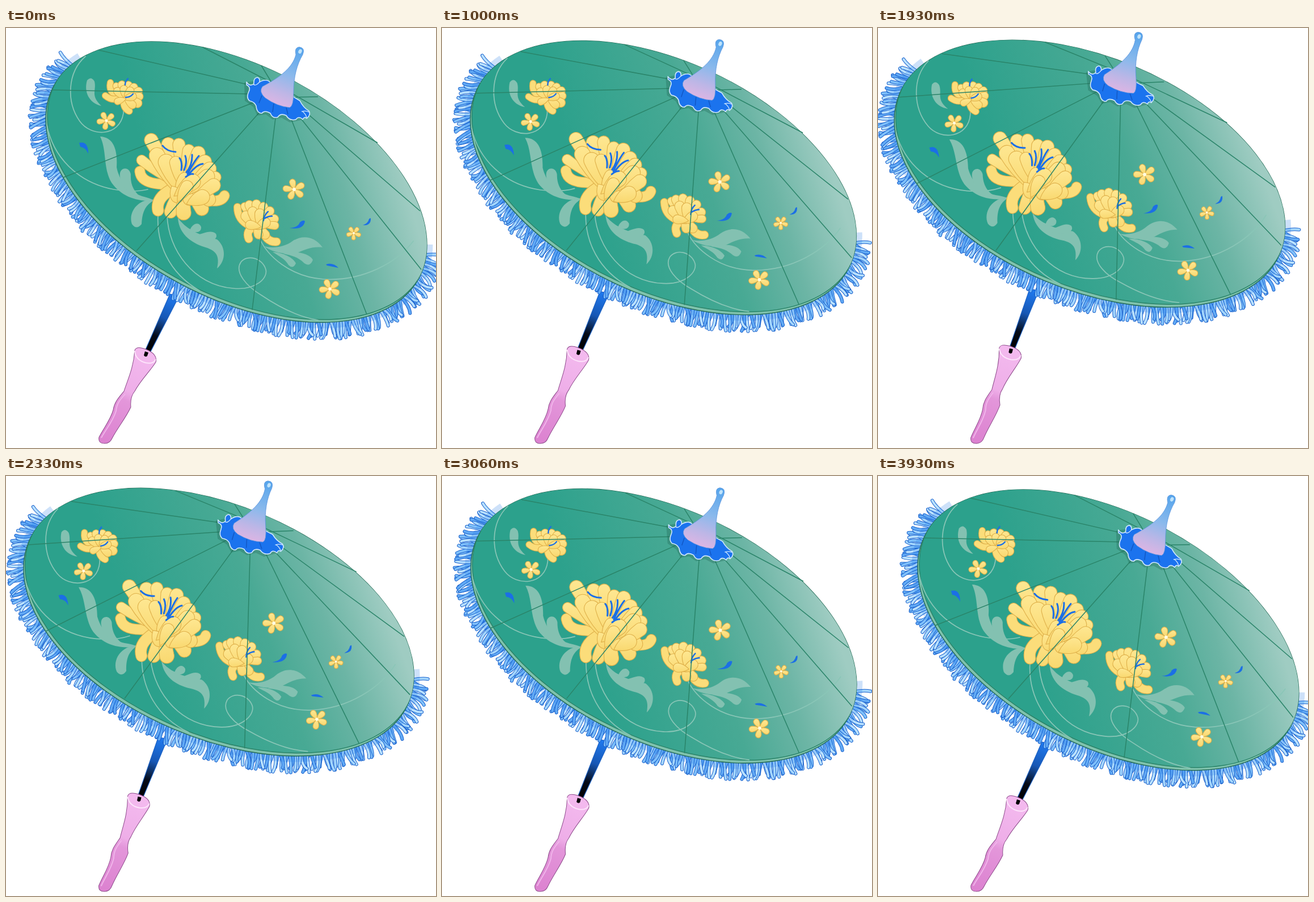
These frames come from a looping animation (758x739 px, 4 s). An HTML page:

```html
<!DOCTYPE html>
<html lang="en">
<head>
<meta charset="utf-8">
<title>Parasol</title>
<style>
html, body { margin: 0; width: 100%; height: 100%; overflow: hidden; background: #fff; }
svg { display: block; width: 100%; height: 100%; }
.line { fill: none; stroke: #8ac6b7; stroke-width: 1.7; stroke-linecap: round; }
.leaf { fill: #83c1b1; }
.petal { fill: url(#gold); stroke: #dfb04a; stroke-width: 1.1; stroke-linejoin: round; }
.curl { fill: none; stroke-linecap: round; }
.ink { fill: none; stroke: #1b6fe6; stroke-width: 3; stroke-linecap: round; }
.rib { stroke: #2a8469; stroke-width: 1.5; }
</style>
</head>
<body>
<svg viewBox="0 0 758 739">
  <defs>
    <linearGradient id="silk" gradientUnits="userSpaceOnUse" x1="330" y1="400" x2="645" y2="106">
      <stop offset="0" stop-color="#2ca18c"/><stop offset=".5" stop-color="#48a994"/>
      <stop offset=".75" stop-color="#6cb5a5"/><stop offset="1" stop-color="#9fccc2"/>
    </linearGradient>
    <linearGradient id="gold" x1="0" y1="0" x2="0" y2="1">
      <stop offset="0" stop-color="#fee791"/><stop offset="1" stop-color="#f9d870"/>
    </linearGradient>
    <linearGradient id="cone" gradientUnits="userSpaceOnUse" x1="517" y1="35" x2="477" y2="138">
      <stop offset="0" stop-color="#56a5ec"/><stop offset=".45" stop-color="#8ab9ec"/>
      <stop offset=".75" stop-color="#bdb6e6"/><stop offset="1" stop-color="#e0b5e3"/>
    </linearGradient>
    <linearGradient id="shaft" gradientUnits="userSpaceOnUse" x1="296" y1="470" x2="252" y2="570">
      <stop offset="0" stop-color="#1f7af0"/><stop offset=".4" stop-color="#1757b4"/>
      <stop offset=".72" stop-color="#050b18"/><stop offset="1" stop-color="#000"/>
    </linearGradient>
    <linearGradient id="pink" gradientUnits="userSpaceOnUse" x1="245" y1="575" x2="174" y2="728">
      <stop offset="0" stop-color="#f3b9ee"/><stop offset=".42" stop-color="#eeaee8"/>
      <stop offset=".52" stop-color="#e396da"/><stop offset="1" stop-color="#dc82d0"/>
    </linearGradient>
    <clipPath id="disc"><ellipse cx="406" cy="271" rx="363.5" ry="204.4" transform="rotate(27.5 406 271)"/></clipPath>
  </defs>

  <g id="parasol">
    <path d="M289 468L305 472L251 577Q246 581 242 575Z" fill="url(#shaft)" stroke="#1d62c4" stroke-width="1.2"/>
    <path d="M227 567C225 598 214 620 208 639C199 650 191 658 189 672C184 690 172 704 164 720Q162 731 174 731Q183 731 187 722C197 703 212 685 220 667C219 655 221 646 227 639C237 620 254 604 264 588Q268 574 246 565Q230 559 227 567Z" fill="url(#pink)" stroke="#8e4c8c"/>
    <path d="M210 644C202 653 195 660 194 674C188 693 176 706 168 721" fill="none" stroke="#f0b4ea" stroke-width="2"/>
    <path d="M227 568Q228 584 246 589Q260 592 264 583" fill="none" stroke="#fde4fb" stroke-width="2"/>
    <path d="M251 571L249 577Q246 580 243 576L245 569Z"/>

    <g id="rim">
      <g id="fringe" fill="none" stroke-linecap="round"></g>
      <ellipse cx="406" cy="271" rx="366" ry="207" transform="rotate(27.5 406 271)" fill="none" stroke="#1d76e4" stroke-width="16" opacity=".22" pathLength="360" stroke-dasharray="194 154 12"/>
      <ellipse cx="406" cy="271" rx="363.5" ry="204.4" transform="rotate(27.5 406 271)" fill="#7fc3ad" stroke="#246a56" stroke-width="1.4"/>
      <g clip-path="url(#disc)">
        <ellipse cx="409" cy="266" rx="363.5" ry="204.4" transform="rotate(27.5 409 266)" fill="url(#silk)" stroke="#2a8469" stroke-width="1.5"/>
      </g>
    </g>

    <g id="decor">
      <g class="line">
        <path d="M140 50C108 78 106 130 130 164C150 192 200 192 207 150Q208 140 204 133"/>
        <path d="M72 170C82 225 125 272 190 284Q225 290 250 284"/>
        <path d="M268 328C265 378 286 430 341 462"/>
        <path d="M284 330C286 390 330 452 400 458C440 462 462 440 458 425C452 404 425 398 414 412C402 430 425 455 450 470C490 497 525 510 550 514"/>
        <path d="M447 370C460 400 500 438 560 442C630 446 690 412 718 375"/>
      </g>
      <g class="leaf">
        <path d="M143 92Q150 84 156 94C160 110 148 118 168 137C146 132 137 112 143 92Z"/>
        <path d="M166 191C190 192 197 215 195 245C200 270 215 288 240 296Q256 300 262 304C230 306 203 296 186 272C171 247 178 215 166 191Z"/>
        <path d="M201 262C198 244 218 242 220 258C219 275 225 290 242 300C215 292 203 279 201 262Z"/>
        <path d="M264 302C232 299 215 325 222 345Q230 356 239 345C240 325 245 310 264 302Z"/>
        <path d="M303 334C305 365 330 380 355 387C371 393 377 402 372 423C388 410 388 385 372 372C350 366 322 360 303 334Z"/>
        <path d="M306 346C330 364 345 362 344 350C339 339 328 346 325 354Z"/>
        <path d="M325 367C350 362 360 354 370 362C376 374 355 380 325 367Z"/>
        <path d="M455 384C470 388 490 386 505 375C520 365 542 364 558 386C540 384 528 390 515 395C495 400 470 395 455 384Z"/>
        <path d="M470 394C485 395 505 402 511 414Q506 425 498 417C492 406 482 402 470 394Z"/>
        <path d="M488 397C508 391 535 396 541 408Q536 421 526 414C515 403 503 400 488 397Z"/>
      </g>
      <g id="blooms"></g>
      <g class="ink">
        <path d="M276 207Q283 217 299 218M309 250Q311 235 306 229M314 250Q320 235 316 225M318 254Q329 240 328 223M320 257Q332 234 340 225M322 258Q336 240 347 239M317 262Q325 256 330 257"/>
        <path d="M210 100Q210 94 215 89M211 122Q219 122 224 116" stroke-width="2.4"/>
        <path d="M454 339Q455 329 462 323M456 335Q462 331 469 331" stroke-width="2.4"/>
      </g>
      <g fill="#1b6fe6">
        <path d="M129 202Q145 198 145 221Q140 210 131 209Z"/>
        <path d="M500 352Q515 351 518 342Q524 337 527 340Q524 356 500 352Z"/>
        <path d="M629 347Q638 344 640 336Q643 333 643 336Q643 348 629 347Z"/>
        <path d="M564 416Q576 412 586 422Q576 420 566 418Z"/>
      </g>
    </g>

    <g id="ribs"></g>

    <path d="M420 96L447 92L533 152L520 162L500 166L486 158L470 161L458 152L443 154L436 139L421 128Z" fill="#1d5e4e" opacity=".3"/>
    <path d="M424 95Q430 104 437 98Q436 88 443 87Q448 88 447 95Q460 88 466 96L518 128Q524 140 534 146Q538 153 530 159Q526 155 523 161Q516 154 511 161Q500 164 494 154Q484 149 479 157Q470 160 466 150Q456 144 451 150Q442 150 441 137Q438 130 429 128Q423 122 428 112Q432 104 424 100Z" fill="#1b73ee" stroke="#cfe7ff" stroke-width="1.6" stroke-linejoin="round"/>
    <path d="M436 99Q440 103 447 95M521 147Q529 145 534 148M523 147Q529 152 530 158" fill="none" stroke="#cfe7ff" stroke-width="1.3"/>
    <path d="M451 119L446 132M472 133L470 148M494 140L497 152" stroke="#1257c4" stroke-width="1.5"/>
    <path d="M511 47C505 70 484 86 452 103Q445 112 457 123Q478 138 500 140Q507 138 507 112C507 86 513 64 523 47Q528 35 517 33.500Q508 34 511 47Z" fill="url(#cone)" stroke="#5a93dc" stroke-width=".8"/>
    <ellipse cx="518.500" cy="41" rx="3" ry="4" fill="#bfe3fb" transform="rotate(25 518 41)"/>
  </g>
</svg>
<script>
const $ = id => document.getElementById(id);
const add = (parent, tag, attrs) => {
  const el = document.createElementNS('http://www.w3.org/2000/svg', tag);
  for (const k in attrs) el.setAttribute(k, attrs[k]);
  return parent.appendChild(el);
};
let seed = 11;
const rand = () => (seed = seed * 16807 % 2147483647) / 2147483647;

// Fringe strands spaced evenly along the lower part of the rim
function drawFringe() {
  const a = 363.5, b = 204.4, tilt = 27.5 * Math.PI / 180;
  const co = Math.cos(tilt), si = Math.sin(tilt);
  const turn = (x, y) => [x * co - y * si, x * si + y * co];
  const tones = ['#a4d6fd', '#7fc0fa', '#b9e1ff', '#62aaf5'];
  for (let t = -0.2; t < 3.4; t += 4.3 / Math.hypot(a * Math.sin(t), b * Math.cos(t))) {
    const [px, py] = turn(a * Math.cos(t), b * Math.sin(t));
    const [nx, ny] = turn(Math.cos(t) / a, Math.sin(t) / b);
    const dir = Math.atan2(ny / Math.hypot(nx, ny) + 0.25, nx / Math.hypot(nx, ny)) + (rand() - 0.5) * 0.7;
    const len = 21 + 9 * rand(), bend = (rand() - 0.5) * 14;
    const dx = Math.cos(dir), dy = Math.sin(dir);
    const x = 406 + px, y = 271 + py;
    const d = `M${x - dx * 4} ${y - dy * 4}Q${x + dx * len * .6 - dy * bend} ${y + dy * len * .6 + dx * bend} ${x + dx * len} ${y + dy * len}`;
    add($('fringe'), 'path', { d, stroke: '#1a62cd', 'stroke-width': 6 });
    add($('fringe'), 'path', { d, stroke: tones[rand() * 4 | 0], 'stroke-width': 4 });
  }
}

const blooms = $('blooms');
function petal(x, y, u, v, w) {
  const len = Math.hypot(u - x, v - y), dx = (u - x) / len, dy = (v - y) / len;
  const nx = -dy * w, ny = dx * w, bx = u - dx * w, by = v - dy * w;
  const mx = (x + bx) / 2, my = (y + by) / 2;
  add(blooms, 'path', { class: 'petal',
    d: `M${x} ${y}Q${mx + nx} ${my + ny} ${bx + nx} ${by + ny}A${w} ${w} 0 0 0 ${bx - nx} ${by - ny}Q${mx - nx} ${my - ny} ${x} ${y}Z` });
}
function curl(d, w) {
  add(blooms, 'path', { d, class: 'curl', stroke: '#dfb04a', 'stroke-width': w + 1.2 });
  add(blooms, 'path', { d, class: 'curl', stroke: '#fbdd7a', 'stroke-width': w - 1 });
}
// Petals as root, tip and half width, back to front
function bloom(curls, petals) {
  curls.forEach(c => curl(...c));
  petals.forEach(p => petal(...p));
}
function star(x, y, r, turn) {
  for (let i = 0; i < 5; i++) {
    const q = (turn + i * 72) * Math.PI / 180;
    petal(x, y, x + r * Math.cos(q), y + r * .92 * Math.sin(q), r * .27);
  }
  add(blooms, 'circle', { cx: x, cy: y, r: r * .15, fill: '#fffbe0' });
}

function drawBlooms() {
  bloom([['M282 275Q238 275 236 252', 18], ['M335 298Q378 312 385 295', 18], ['M290 285Q264 300 268 321', 20]], [
    [300, 275, 250, 187, 12], [305, 275, 283, 193, 12], [310, 270, 304, 194, 11], [312, 275, 324, 205, 11],
    [315, 275, 344, 209, 12], [318, 275, 358, 226, 12], [320, 280, 368, 240, 12], [325, 285, 378, 258, 10],
    [300, 280, 232, 227, 9], [305, 275, 287, 334, 11], [310, 275, 314, 338, 13], [318, 278, 352, 328, 12],
    [320, 280, 368, 308, 12], [315, 285, 328, 311, 11], [300, 292, 260, 212, 14], [305, 292, 277, 223, 14],
    [310, 285, 297, 226, 11], [298, 292, 322, 256, 12], [312, 296, 365, 253, 13], [325, 305, 376, 270, 12],
    [292, 278, 308, 306, 12], [296, 296, 340, 262, 14], [318, 310, 358, 292, 13], [302, 306, 325, 270, 11]
  ]);
  bloom([['M430 348Q408 338 408 315', 13], ['M450 350Q458 378 477 376', 14], ['M438 350Q422 356 428 371', 14]], [
    [440, 345, 417, 308, 7], [442, 345, 426, 304, 8], [443, 345, 441, 302, 8], [445, 345, 456, 307, 8],
    [446, 345, 470, 316, 8], [448, 346, 480, 333, 8], [446, 346, 481, 348, 7], [442, 345, 462, 370, 8],
    [440, 342, 447, 371, 8], [444, 355, 417, 324, 9], [446, 355, 432, 315, 9], [446, 354, 448, 318, 9],
    [438, 354, 465, 338, 9], [450, 350, 422, 345, 8]
  ]);
  bloom([['M200 120Q180 115 184 96', 11], ['M202 122Q188 130 175 119', 11], ['M208 125Q206 140 217 146', 12]], [
    [207, 122, 191, 97, 6], [208, 122, 203, 93, 7], [209, 122, 218, 94, 7], [210, 122, 230, 99, 7],
    [211, 122, 240, 108, 7], [211, 122, 242, 120, 7], [209, 120, 239, 136, 8], [208, 122, 228, 140, 7],
    [209, 126, 192, 106, 7], [210, 126, 207, 101, 7], [208, 126, 223, 105, 7], [205, 125, 230, 119, 7],
    [212, 124, 191, 131, 6]
  ]);
  star(177, 163, 17, 28);
  star(508, 284, 20, 42);
  star(613, 361, 13, 20);
  star(571, 459, 19, 30);
}

const ribs = [
  [480, 117, 82, 109], [480, 112, 164, 39], [480, 102, 347, 34], [478, 112, 450, 66],
  [480, 114, 101, 263], [472, 120, 230, 392], [480, 118, 434, 496], [488, 122, 636, 504],
  [490, 122, 732, 425], [490, 115, 730, 322], [490, 107, 655, 202], [490, 122, 550, 121]
].map(([x1, y1, x2, y2]) => ({ x2, y2, el: add($('ribs'), 'line', { class: 'rib', x1, y1, x2, y2 }) }));

function pose(ms) {
  const step = Math.floor((Math.floor(ms / 10) * 10 + 6.7) / (4000 / 60));
  const k = (1 - Math.cos(2 * Math.PI * (step / 60 - 0.005))) / 2;
  const sx = 5.5 * k, sy = 3.5 * k;
  $('parasol').setAttribute('transform', `rotate(${-4.8 * k} 174 725)`);
  // The cloth lags slightly behind the pole
  $('rim').setAttribute('transform', `translate(${sx} ${sy})`);
  $('decor').setAttribute('transform', `matrix(${1 - .0124 * k} ${-.009 * k} 0 1 ${6.2 * k} ${4.5 * k})`);
  for (const r of ribs) {
    r.el.setAttribute('x2', r.x2 + sx);
    r.el.setAttribute('y2', r.y2 + sy);
  }
}

drawFringe();
drawBlooms();
const start = performance.now();
function tick() {
  pose((performance.now() - start) % 4000);
  requestAnimationFrame(tick);
}
tick();
</script>
</body>
</html>
```
